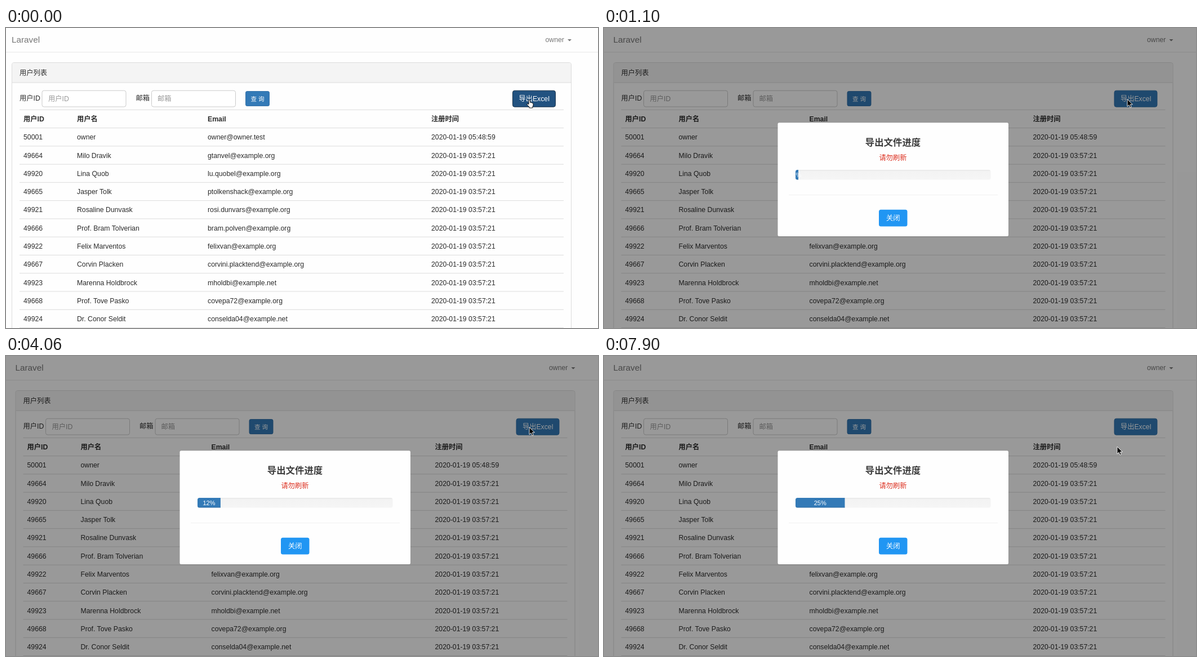
Write an HTML page that moves like this. It is 1051 by 533 pixels and loops after 8 s.

```html
<!DOCTYPE html>
<html lang="zh-CN">
<head>
<meta charset="utf-8">
<style>
html, body { margin: 0; height: 100%; overflow: hidden; background: #fefefe; }
svg { display: block; width: 1051px; height: 533px; }
text { font: 12.25px "Liberation Sans", Arial, "Noto Sans CJK SC", "Noto Sans CJK", sans-serif; fill: #2b2b2b; white-space: pre; }
.bold { font-weight: bold; }
.mid { text-anchor: middle; }
.white { fill: #fff; }
.hint { fill: #999; }
.nav { fill: #777; }
.brand { font-size: 15.3px; }
.small { font-size: 10.5px; }
.pct { font-size: 11px; }
.title { font-size: 16.4px; font-weight: bold; fill: #3c3c3c; }
.red { fill: #dc2f1f; }
</style>
</head>
<body>
<svg viewBox="0 0 1051 533">
  <defs>
    <clipPath id="round"><rect x="340" y="252" width="346.5" height="17.5" rx="3.5"/></clipPath>
    <linearGradient id="groove" x2="0" y2="1">
      <stop offset="0" stop-color="#e6e6e6"/><stop offset=".15" stop-color="#f3f3f3"/><stop offset="1" stop-color="#f5f5f5"/>
    </linearGradient>
  </defs>
  <g id="page"></g>
  <rect id="shade" width="1051" height="533" fill-opacity=".4"/>
  <g id="modal"></g>
  <path id="arrow" d="M0 0V13L3 10.2L5 14.9L7.3 13.9L5.3 9.4H9.4Z" stroke="#fff" stroke-width=".9"/>
  <path id="hand" d="M928 135.5V129.2Q928 127.7 929.2 127.7T930.4 129.2V132.3Q932 131.5 932.5 132.8Q934 132.2 934.4 133.5Q936 133.2 936 134.8V137Q936 138.5 934.8 140V142H929V140.3L925 136.3Q924.6 134.8 926 134.6Z" fill="#fff" stroke="#000" stroke-width=".9"/>
</svg>
<script>
const $ = id => document.getElementById(id);
const text = (x, y, s, cls = '') => `<text x="${x}" y="${y}" class="${cls}">${s}</text>`;
const box = (x, y, w, h, fill, stroke = 'none', rx = 3.5, more = '') =>
  `<rect x="${x}" y="${y}" width="${w}" height="${h}" rx="${rx}" fill="${fill}" stroke="${stroke}" stroke-width=".9" ${more}/>`;
const rule = (x1, x2, y, color) => `<path d="M${x1} ${y}H${x2}" stroke="${color}" stroke-width=".9"/>`;

const columns = [31, 126, 358, 755];
const users = [
  [50001, 'owner', 'owner@owner.test'],
  [49664, 'Milo Dravik', 'gtanvel@example.org'],
  [49920, 'Lina Quob', 'lu.quobel@example.org'],
  [49665, 'Jasper Tolk', 'ptolkenshack@example.org'],
  [49921, 'Rosaline Dunvask', 'rosi.dunvars@example.org'],
  [49666, 'Prof. Bram Tolverian', 'bram.polven@example.org'],
  [49922, 'Felix Marventos', 'felixvan@example.org'],
  [49667, 'Corvin Placken', 'corvini.placktend@example.org'],
  [49923, 'Marenna Holdbrock', 'mholdbi@example.net'],
  [49668, 'Prof. Tove Pasko', 'covepa72@example.org'],
  [49924, 'Dr. Conor Seldit', 'conselda04@example.net'],
];
const row = (cells, y, cls) => cells.map((s, i) => text(columns[i], y, s, cls)).join('');

$('page').innerHTML =
  box(-10, -1, 1070, 44, '#fefefe', '#e2e2e2', 0) +
  text(10, 26, 'Laravel', 'nav brand') + text(957.5, 25.3, 'owner', 'nav') +
  '<path d="M997 20H1004L1000.5 23.6Z" fill="#777"/>' +
  box(10.5, 61.5, 993, 500, '#fefefe', '#d9d9d9') +
  '<path d="M11 97V65Q11 62 14 62H1000Q1003 62 1003 65V97Z" fill="#f4f4f4"/>' +
  rule(11, 1003, 97, '#d9d9d9') +
  text(24, 83.6, '用户列表') +
  text(24, 128.7, '用户ID') + box(64, 111.2, 149, 28.8, '#fff', '#c6c6c6') + text(75, 130, '用户ID', 'hint') +
  text(230.5, 128.7, '邮箱') + box(258.5, 111.2, 149, 28.8, '#fff', '#c6c6c6') + text(269, 130, '邮箱', 'hint') +
  box(425.5, 112.5, 42, 26, '#337ab7', '#2e6da4', 2.6) + text(446.5, 129.6, '查 询', 'mid white small') +
  box(899.5, 111.2, 76, 29, '', '', 3.5, 'id="export"') + text(937.7, 130, '导出Excel', 'mid white') +
  row(['用户ID', '用户名', 'Email', '注册时间'], 165.7, 'bold') +
  users.map((u, i) => row([...u, '2020-01-19 ' + (i ? '03:57:21' : '05:48:59')], 198.2 + i * 32.3)).join('') +
  Array.from({ length: 13 }, (_, i) => rule(24, 990, 145.3 + i * 32.27, '#d9d9d9')).join('');

$('modal').innerHTML =
  box(308.5, 168.3, 409.5, 201.7, '#fefefe', 'none', 2.5) +
  text(513, 209.3, '导出文件进度', 'title mid') + text(513, 234.6, '请勿刷新', 'mid red') +
  box(340, 252, 346.5, 17.5, 'url(#groove)') +
  '<g clip-path="url(#round)">' + box(340, 252, 0, 17.5, '#337ab7', 'none', 0, 'id="bar"') +
  box(340, 268.6, 0, 1, '#2b689c', 'none', 0, 'id="edge"') + '</g>' +
  '<text id="label" y="264.6" class="mid white pct"></text>' +
  `<g id="line">${rule(328, 699, 296.6, '#f0f0f0')}</g>` +
  box(488, 322.8, 50.5, 29.7, '#2196f3') + text(513.2, 342.3, '关闭', 'mid white');

const LOOP = 8000, STEP = 147.87, START = 945;
const show = (id, on) => $(id).setAttribute('visibility', on ? 'visible' : 'hidden');
const set = (id, name, value) => $(id).setAttribute(name, value);

function draw(t) {
  const open = t >= 360, settled = t >= 510;
  set('page', 'transform', `translate(${open ? 6.5 : 0} 0)`);
  set('export', 'fill', open ? '#337ab7' : t < 150 ? '#225280' : '#1f4b73');
  set('export', 'stroke', open ? '#2e6da4' : '#122b40');
  show('shade', open);
  $('modal').style.display = open ? '' : 'none';
  $('line').style.display = settled ? '' : 'none';
  set('modal', 'transform', `translate(513 269) scale(${settled ? 1 : .953}) translate(-513 -269)`);

  // progress advances steadily, shown in discrete ticks
  const tick = START + Math.floor((t - START) / STEP) * STEP;
  const percent = t < START ? 0 : (tick - 680) * .0035;
  const width = percent * 3.465;
  set('bar', 'width', width);
  set('edge', 'width', width);
  set('label', 'x', 340 + width / 2);
  $('label').textContent = percent ? Math.floor(percent + .3) + '%' : '';

  const away = Math.min(1, Math.max(0, (tick - 7450) / 445)) ** 1.4;
  const x = (t < START ? 928.3 : 929) - 18 * away, y = 126.5 + 34.5 * away;
  set('arrow', 'transform', `translate(${x} ${y})`);
  show('arrow', t >= 150);
  show('hand', t < 150);
}

const begin = performance.now();
function frame() {
  draw((performance.now() - begin) % LOOP);
  requestAnimationFrame(frame);
}
frame();
</script>
</body>
</html>
```
